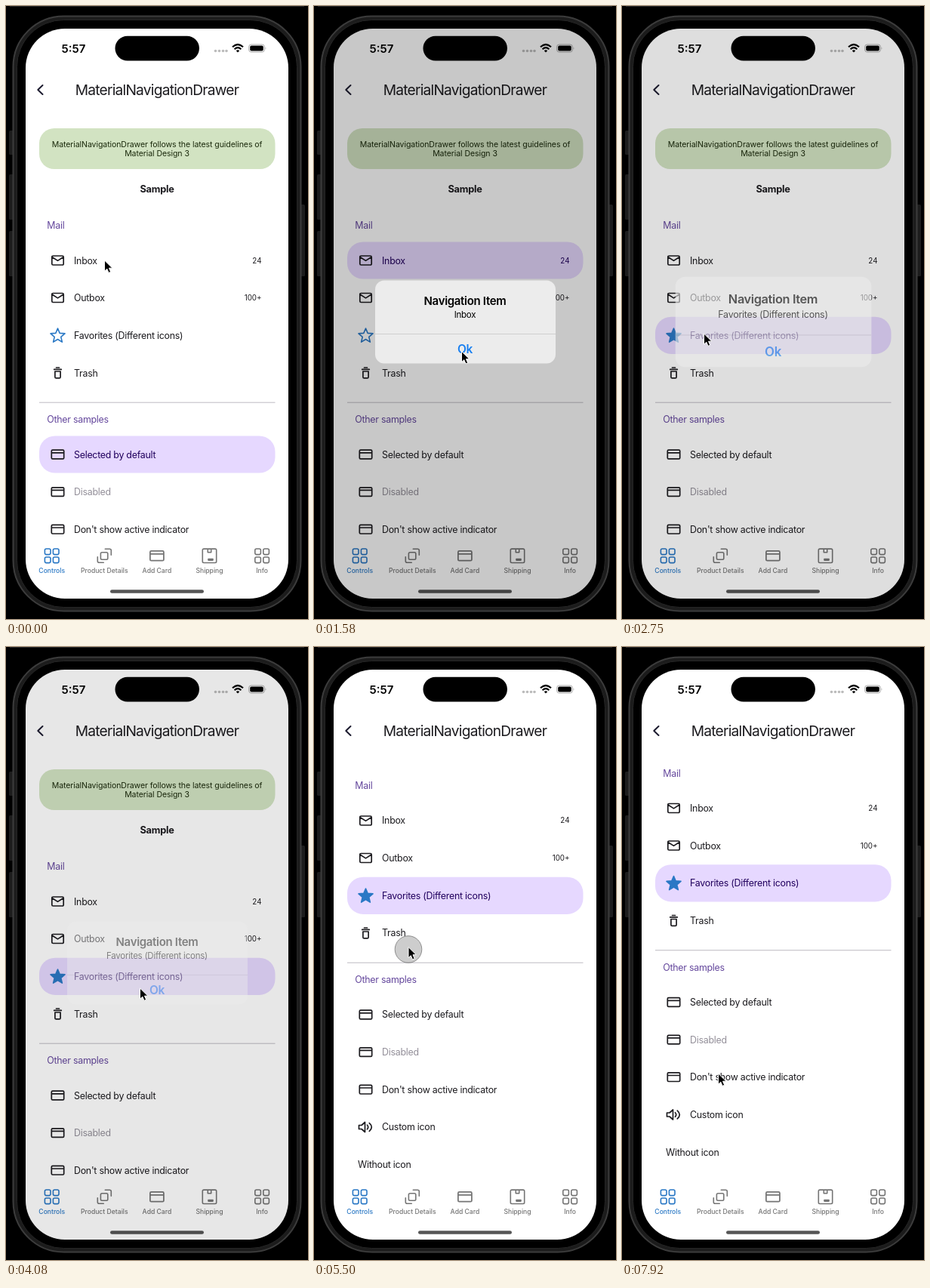
An HTML page that plays this animation: 400 by 812 pixels, repeating every 8000 ms.

```html
<!DOCTYPE html>
<html lang="en">
<head>
<meta charset="utf-8">
<title>Navigation drawer</title>
<style>
html, body { margin: 0; width: 100%; height: 100%; overflow: hidden; background: #000; }
svg { display: block; width: 100%; height: 100%; }
text { font: 400 12.4px Inter, "Open Sans", sans-serif; letter-spacing: -.021em; fill: #1c1b1f; }
.mid { text-anchor: middle; }
.icon { fill: none; stroke: #1c1b1f; stroke-width: 1.7; stroke-linejoin: round; stroke-linecap: round; }
.head { fill: #65489d; }
.badge { font-size: 9.8px; letter-spacing: 0; text-anchor: end; }
.row .pill { fill: none; }
.row.sel .pill { fill: #e6d8ff; }
.row.sel text { fill: #21005d; }
.row.off text { fill: #938f99; }
.row .star { stroke: #2a78c5; stroke-width: 1.6; }
.row.sel .star { fill: #2a78c5; }
.tab .icon { stroke: #757575; stroke-width: 1.6; }
.tab text { font-size: 8.6px; font-weight: 500; letter-spacing: 0; fill: #757575; }
.tab.on .icon { stroke: #2a78c5; }
.tab.on text { fill: #2a78c5; }
</style>
</head>
<body>
<svg viewBox="0 0 400 812">
  <defs>
    <clipPath id="listArea"><rect x="26" y="152" width="348" height="556"/></clipPath>
  </defs>

  <rect width="400" height="812"/>
  <rect x="5" width="390" height="1" fill="#2a2a2a"/>
  <g fill="#1d1d1d">
    <rect x="4" y="165" width="7" height="32" rx="1.5"/>
    <rect x="4" y="223" width="7" height="60" rx="1.5"/>
    <rect x="4" y="298" width="7" height="60" rx="1.5"/>
    <rect x="389" y="263" width="7" height="95" rx="1.5"/>
  </g>
  <rect x="9.5" y="13.5" width="381" height="788" rx="67" fill="#1c1c1c" stroke="#3c3c3c" stroke-width="2"/>
  <rect x="14.5" y="18.5" width="371" height="778" rx="62" stroke="#262626"/>
  <rect x="26" y="30" width="348" height="755" rx="52" fill="#fff"/>

  <text x="73.5" y="61.5" style="font-size:15px;font-weight:600;letter-spacing:0;fill:#000">5:57</text>
  <g fill="#bbb">
    <circle cx="277.5" cy="59.5" r="1.8"/><circle cx="282.5" cy="59.5" r="1.8"/>
    <circle cx="287.5" cy="59.5" r="1.8"/><circle cx="292" cy="59.5" r="1.8"/>
  </g>
  <g fill="none" stroke="#000" stroke-width="2.2">
    <path d="M300 54.2Q307 47.8 314 54.2M302.6 57.2Q307 53.2 311.4 57.2"/>
    <path d="M304.8 59.2Q307 57.2 309.2 59.2L307 61.5Z" fill="#000" stroke="none"/>
  </g>
  <rect x="321.7" y="51" width="20.6" height="10" rx="3" fill="none" stroke="#aaa"/>
  <rect x="323.2" y="52.5" width="17.6" height="7" rx="1.8"/>
  <path d="M343.6 54.3q1.8 1.7 0 3.4z" fill="#aaa"/>

  <path class="icon" d="M48.5 105L42.3 111L48.5 117" style="stroke-width:2;stroke:#1c1b2f"/>
  <text class="mid" x="200" y="118" style="font-size:19.2px;letter-spacing:-.78px">MaterialNavigationDrawer</text>

  <g clip-path="url(#listArea)"><g id="list"></g></g>
  <g id="tabs"></g>
  <rect x="138" y="773.2" width="124" height="4.6" rx="2.3" fill="#555"/>

  <rect id="dim" x="26" y="30" width="348" height="755" rx="52"/>
  <rect x="144.5" y="39.7" width="111.5" height="32.8" rx="16.4"/>

  <g id="alert">
    <rect x="81" y="363.5" width="239" height="110" rx="12" fill="#ececec"/>
    <path d="M81 434.5H320" stroke="#cfcfcf"/>
    <text class="mid" x="200" y="395.5" style="font-size:15px;font-weight:600;fill:#000">Navigation Item</text>
    <text class="mid" id="message" x="200" y="413" style="font-size:11.5px;fill:#000"></text>
    <text class="mid" x="200" y="460" style="font-size:15.5px;font-weight:600;fill:#1a80f0">Ok</text>
  </g>

  <g id="cursor">
    <circle id="touch" cy="3" r="17.8" fill="#888" fill-opacity=".42" stroke="#777" stroke-width=".8"/>
    <path d="M0 0V14.2L3.3 11.2L5.5 16.4L8.2 15.2L6 10.2H10.4Z" stroke="#fff" stroke-width="1"/>
  </g>
</svg>
<script>
const $ = id => document.getElementById(id);
const LOOP = 8000, MAX_SCROLL = 123.5;

const starPoints = Array.from({ length: 10 }, (_, i) => {
  const r = i % 2 ? 4.5 : 10, a = i * Math.PI / 5 - Math.PI / 2;
  return `${(r * Math.cos(a)).toFixed(2)},${(r * Math.sin(a) + .7).toFixed(2)}`;
}).join(' ');

// Icons are drawn around their own centre.
const icon = d => `<path class="icon" d="${d}"/>`;
const icons = {
  mail: icon('M-6.1-6h12.2q1.6 0 1.6 1.6v8.8q0 1.6-1.6 1.6h-12.2q-1.6 0-1.6-1.6v-8.8q0-1.6 1.6-1.6zM-7.2-4.2L0 .4L7.2-4.2'),
  card: icon('M-6.8-5.8h13.6q1.4 0 1.4 1.4v8.8q0 1.4-1.4 1.4h-13.6q-1.4 0-1.4-1.4v-8.8q0-1.4 1.4-1.4zM-8.2-2.2h16.4'),
  trash: icon('M-4.8-4.6h9.6M-2-7h4M-3.6-2v7.4q0 1.5 1.5 1.5h4.2q1.5 0 1.5-1.5v-7.4z'),
  star: `<polygon class="icon star" points="${starPoints}"/>`,
  sound: icon('M-9-2.5h3.5l4.5-4v13l-4.5-4h-3.5zM2-2.8q2.4 2.8 0 5.6M4.8-5.4q6 5.4 0 10.8'),
  grid: [-9.3, 1.7].map(x => [-9.3, 1.7].map(y =>
    `<rect class="icon" x="${x}" y="${y}" width="7.6" height="7.6" rx="2"/>`).join('')).join(''),
  copy: icon('M-3.2-4.5h6q1.7 0 1.7 1.7v6q0 1.7-1.7 1.7h-6q-1.7 0-1.7-1.7v-6q0-1.7 1.7-1.7zM1-9h6q2 0 2 2v6M-9 1.5v5.5q0 2 2 2h6'),
  box: icon('M-7.5-9.2h15q1.7 0 1.7 1.7v15q0 1.7-1.7 1.7h-15q-1.7 0-1.7-1.7v-15q0-1.7 1.7-1.7zM-2.2-9v4.4h4.4v-4.4M-1.5 4.2h6v1.6h-6z'),
};

const rows = [
  { y: 337, icon: 'mail', label: 'Inbox', badge: '24' },
  { y: 386.5, icon: 'mail', label: 'Outbox', badge: '100+' },
  { y: 436.3, icon: 'star', label: 'Favorites (Different icons)' },
  { y: 486, icon: 'trash', label: 'Trash' },
  { y: 594, icon: 'card', label: 'Selected by default' },
  { y: 643.6, icon: 'card', label: 'Disabled', off: true },
  { y: 693.2, icon: 'card', label: "Don't show active indicator" },
  { y: 743, icon: 'sound', label: 'Custom icon' },
  { y: 792.6, label: 'Without icon' },
];
const INBOX = 0, FAVORITES = 2, DEFAULT = 4;

const rowMarkup = r => `<g class="row${r.off ? ' off' : ''}" transform="translate(0 ${r.y})">
  <rect class="pill" x="44" y="-24.6" width="312.5" height="49.2" rx="21"/>
  ${r.icon ? `<g transform="translate(68.5 0)">${icons[r.icon]}</g>` : ''}
  <text x="${r.icon ? 90 : 58}" y="4.5">${r.label}</text>
  ${r.badge ? `<text class="badge" x="338.5" y="3.5">${r.badge}</text>` : ''}</g>`;

const notice = ['MaterialNavigationDrawer follows the latest guidelines of', 'Material Design 3'];

$('list').innerHTML = `
  <rect x="44" y="162" width="312.5" height="54" rx="20" fill="#d2e3c2"/>
  ${notice.map((line, i) => `<text class="mid" x="200" y="${186.7 + i * 12.6}"
    style="font-size:10.55px;letter-spacing:-.008em;fill:#1b2a0c">${line}</text>`).join('')}
  <text class="mid" x="200" y="246.8" style="font-size:12.8px;font-weight:700">Sample</text>
  <text class="head" x="54.3" y="295">Mail</text>
  <path d="M44 525.2H356.5" stroke="#bdbac2"/>
  <text class="head" x="54.3" y="552">Other samples</text>
  ${rows.map(rowMarkup).join('')}`;

$('tabs').innerHTML = [['Controls', 'grid'], ['Product Details', 'copy'], ['Add Card', 'card'], ['Shipping', 'box'], ['Info', 'grid']]
  .map(([label, name], i) => `<g class="tab${i ? '' : ' on'}" transform="translate(${60.7 + i * 69.6} 728.3)">
    <g${name === 'card' ? ' transform="scale(1.1)"' : ''}>${icons[name]}</g>
    <text class="mid" y="22.7">${label}</text></g>`).join('');

const clamp = v => Math.min(1, Math.max(0, v));
const smooth = x => x * x * (3 - 2 * x);
const rowNodes = [...document.querySelectorAll('.row')];

// Pointer stops: time, x, y
const DRAG = { from: 5000, to: 5650, press: 4900, release: 5720 };
const path = [
  [0, 130.5, 337], [700, 130.5, 337], [1350, 195.5, 457.5], [1850, 195.5, 457.5],
  [2450, 108.5, 434], [3000, 108.5, 434], [3600, 177.5, 452], [4150, 177.5, 452],
  [4800, 125, 504.5], [DRAG.from, 125, 504.5], [DRAG.to, 125, 504.5 - MAX_SCROLL],
  [5750, 125, 381], [6350, 147.5, 546], [6700, 147.5, 546], [7700, 127.5, 565], [LOOP, 127.5, 565],
];
const taps = [[230, 330], [1640, 1730], [2500, 2600], [3850, 3940], [DRAG.press, DRAG.release]];
const alerts = [
  { open: 380, close: 1730, row: INBOX },
  { open: 2620, close: 3940, row: FAVORITES },
];

function pointerAt(t) {
  const i = path.findIndex(p => p[0] > t);
  const [t0, x0, y0] = path[i - 1], [t1, x1, y1] = path[i];
  const k = smooth((t - t0) / (t1 - t0));
  return [x0 + (x1 - x0) * k, y0 + (y1 - y0) * k];
}

function draw(t) {
  const selected = t < 330 ? DEFAULT : t < 2600 ? INBOX : FAVORITES;
  rowNodes.forEach((node, i) => node.classList.toggle('sel', i === selected));

  const scroll = MAX_SCROLL * smooth(clamp((t - DRAG.from) / (DRAG.to - DRAG.from)));
  $('list').setAttribute('transform', `translate(0 ${-scroll})`);

  const current = t < 2300 ? alerts[0] : alerts[1];
  const opened = 1 - (1 - clamp((t - current.open) / 350)) ** 2;
  const shown = opened * (1 - clamp((t - current.close) / 250));
  const scale = 1 + .22 * (1 - opened);
  $('message').textContent = rows[current.row].label;
  $('dim').setAttribute('opacity', .215 * shown);
  $('alert').setAttribute('opacity', shown);
  $('alert').setAttribute('transform', `translate(200 418.5) scale(${scale}) translate(-200 -418.5)`);

  $('cursor').setAttribute('transform', `translate(${pointerAt(t)})`);
  $('touch').setAttribute('opacity', taps.some(([a, b]) => t >= a && t < b) ? 1 : 0);
}

const start = performance.now();
function tick() {
  draw((performance.now() - start) % LOOP);
  requestAnimationFrame(tick);
}
tick();
</script>
</body>
</html>
```
